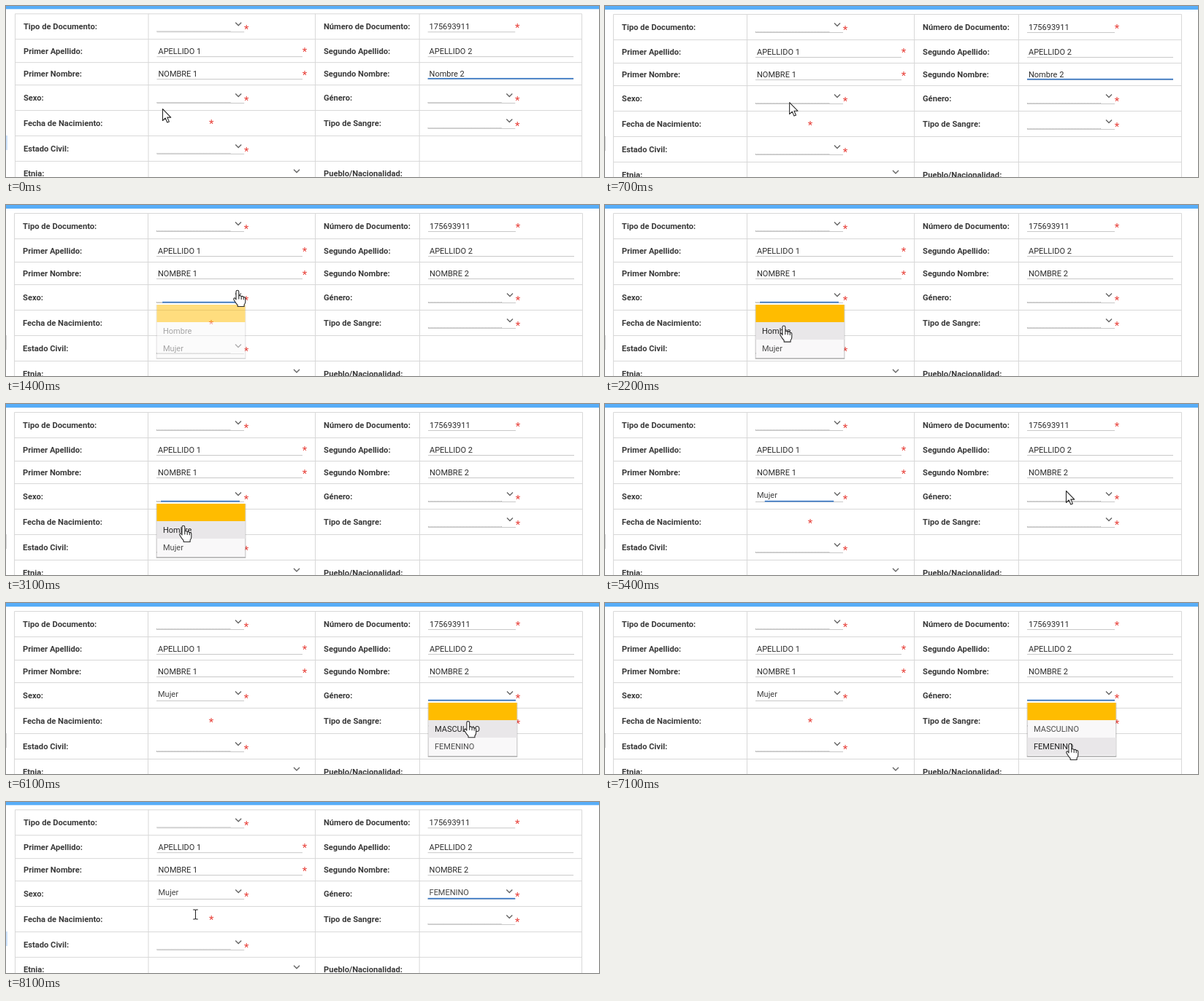
Recreate the animation shown at these times as an HTML page. Size 812x235 px, loop 8200 ms.

```html
<!DOCTYPE html>
<html lang="es">
<head>
<meta charset="utf-8">
<title>Formulario</title>
<style>
html, body { margin: 0; width: 100%; height: 100%; overflow: hidden; background: #fff; }
svg { display: block; width: 812px; height: 235px; }
text { font: 11px Roboto, Arial, sans-serif; fill: #2b2b2b; white-space: pre; }
.label { font-size: 11.2px; font-weight: 700; fill: #3a3a3a; }
.star { font-size: 15px; fill: #e8413a; text-anchor: middle; }
.value { fill: #444; }
.grid { stroke: #d8d8d8; fill: none; }
.line { stroke: #c8c8c8; }
.dots { stroke: #a8a8a8; stroke-dasharray: 1 1; }
.chevron { fill: none; stroke: #666; stroke-width: 1.4; }
</style>
</head>
<body>
<svg id="stage" viewBox="0 0 812 235"></svg>
<script>
const LOOP = 8200, STEP = 100;
const stage = document.getElementById('stage');

function set(el, attrs) {
  for (const k in attrs) el.setAttribute(k, attrs[k]);
}
function add(parent, tag, attrs, text) {
  const el = document.createElementNS('http://www.w3.org/2000/svg', tag);
  set(el, attrs);
  if (text) el.textContent = text;
  parent.appendChild(el);
  return el;
}

// Page and table grid
const page = add(stage, 'g', {});
const cols = [11.5, 194.5, 423.5, 566.5, 789.5];
const rows = [11.5, 46.5, 78.5, 109.5, 144.5, 179.5, 214.5, 248.5];
add(page, 'rect', { x: -5, y: -5, width: 822, height: 10, fill: '#57adf8' });
const edge = add(page, 'rect', { x: -1, y: 179, width: 2, height: 20 });
add(page, 'path', {
  class: 'grid',
  d: cols.map(x => `M${x} 11.5V245`).join('') + rows.map(y => `M11.5 ${y}H789.5`).join('')
});

// Form cells: every part is placed from the middle of its row
const rule = (x1, x2, y, cls) => add(page, 'line', { x1, x2, y1: y, y2: y, class: cls });
const star = (x, y) => add(page, 'text', { x, y: y + 7.5, class: 'star' }, '*');
const lineOf = mid => Math.floor(mid + 7.5) + .5;

const input = (text, width, required) => (x, mid) => {
  rule(x, x + width, lineOf(mid), 'line');
  if (required) star(x + width + 3, mid - 1);
  return { value: add(page, 'text', { x: x + 2, y: mid + 4 }, text) };
};
const select = (width, required) => (x, mid) => {
  const y = lineOf(mid), end = x + width;
  const dots = rule(x, end - 18, y - 1, 'dots');
  rule(x, end, y, 'line');
  add(page, 'path', { d: `M${end - 12} ${mid - 5.5}l4 4 4-4`, class: 'chevron' });
  if (required) star(end + 3, mid + 1.5);
  return { dots, value: add(page, 'text', { x: x + 2, y: mid + 2.2, class: 'value' }) };
};
const date = (x, mid) => star(x + 75, mid - 1);

const form = [
  ['Tipo de Documento:', select(120, true), 'Número de Documento:', input('175693911', 120, true)],
  ['Primer Apellido:', input('APELLIDO 1', 200, true), 'Segundo Apellido:', input('APELLIDO 2', 200)],
  ['Primer Nombre:', input('NOMBRE 1', 200, true), 'Segundo Nombre:', input('', 200)],
  ['Sexo:', select(120, true), 'Género:', select(120, true)],
  ['Fecha de Nacimiento:', date, 'Tipo de Sangre:', select(120, true)],
  ['Estado Civil:', select(120, true)],
  ['Etnia:', select(200), 'Pueblo/Nacionalidad:']
];
const mids = form.map((_, i) => (rows[i] + rows[i + 1]) / 2);
const cells = form.map((row, i) => row.map((part, j) => {
  const x = cols[j] + 11.5;
  return typeof part === 'string'
    ? add(page, 'text', { x, y: mids[i] + 4, class: 'label' }, part)
    : part(x, mids[i]);
}));
const secondName = cells[2][3], sex = cells[3][1], gender = cells[3][3];

// Focus underline that grows from its middle
function focusLine(col, row, w) {
  const x = cols[col] + 11.5;
  const el = add(page, 'rect', { y: lineOf(mids[row]) - 1.7, height: 1.7, fill: '#3878c6' });
  return k => set(el, { x: x + w * (1 - k) / 2, width: w * k });
}
const nameFocus = focusLine(3, 2, 200);
const sexFocus = focusLine(1, 3, 120);
const genderFocus = focusLine(3, 3, 120);

// Dropdown: blank selected row and two options
const TOP = 137, ITEM = 24, WIDE = 121;
function menu(col, options) {
  const x = cols[col] + 12;
  const g = add(page, 'g', {});
  const box = (i, n, fill) =>
    add(g, 'rect', { x, y: TOP + ITEM * i, width: WIDE, height: ITEM * n, fill });
  for (const d of [.4, 1]) {
    add(g, 'rect', {
      x: x - d, y: TOP + 1 - d, width: WIDE + 2 * d, height: ITEM * 3 + 1 + 2 * d, opacity: .18
    });
  }
  box(0, 3.05, '#f9f8f9');
  box(0, 1, '#ffbc00');
  const items = options.map((s, i) => ({
    bg: box(i + 1, 1, '#e9e7e9'),
    text: add(g, 'text', { x: x + 8.5, y: TOP + ITEM * (i + 1) + 16 }, s)
  }));
  return (opacity, y) => {
    set(g, { opacity });
    const hover = Math.floor((y - TOP) / ITEM) - 1;
    items.forEach(({ bg, text }, i) => {
      set(bg, { opacity: i === hover ? 1 : 0 });
      text.style.fill = i === hover ? '#222' : '#4c4c4c';
    });
  };
}
const sexMenu = menu(1, ['Hombre', 'Mujer']);
const genderMenu = menu(3, ['MASCULINO', 'FEMENINO']);

// Pointers, with the hot spot at 0,0
const pointer = (d, fill) => add(stage, 'path', {
  d, fill, stroke: '#2a2a2a', 'stroke-width': 1.1, 'stroke-linejoin': 'round', 'stroke-linecap': 'round'
});
const pointers = {
  arrow: pointer('M.5 .5V16.5L4.2 13 6.8 19 9.4 17.9 6.8 12.1H11.8Z', '#fff'),
  hand: pointer('M-2 13V2.2a1.9 1.9 0 0 1 3.8 0V8q1.8-1.2 3.4 .7 2-.9 3.1 .9 2.2-.4 2.5 1.7V16' +
    'q0 2.4-1.7 4.2V22.5H.2V20.6Q-2.6 17.6-5 13.2-5.7 11-3.8 10.8-2.8 11-2 13' +
    'M1.8 8V12M5.2 9V12.4M8.3 10V12.8', '#fff'),
  beam: pointer('M-3-6.5H-1L0-5.8 1-6.5H3M0-5.8V5.8M-3 6.5H-1L0 5.8 1 6.5H3', 'none')
};

// Pointer moves: start, end, x, y
const home = [214, 141];
const moves = [
  [600, 1300, 317, 117],
  [1500, 2500, 243, 167],
  [3100, 3500, 246, 186],
  [4100, 4700, 566, 133],
  [4900, 5400, 631, 119],
  [5700, 6400, 633, 166],
  [6700, 7100, 637, 193],
  [7700, 8100, 259.5, 154.5]
];

const ramp = (t, a, b) => Math.min(1, Math.max(0, (t - a) / (b - a)));
const easeOut = k => 1 - (1 - k) ** 3;
const between = (t, a, b) => t >= a && t < b;

function pointerAt(t) {
  return moves.reduce(([px, py], [a, b, x, y]) => {
    const k = easeOut(ramp(t, a, b));
    return [px + (x - px) * k, py + (y - py) * k];
  }, home);
}

function choose(cell, text, chosen) {
  cell.value.textContent = chosen ? text : '';
  set(cell.dots, { opacity: chosen ? 0 : 1 });
}

function render(t) {
  const [x, y] = pointerAt(t);

  // Slightly zoomed out around the loop point
  const zoomed = !between(t, 300, 8100);
  set(page, { transform: zoomed ? 'matrix(.9975 0 0 .998 1.03 -.7)' : 'translate(0 0)' });
  set(edge, { fill: zoomed ? '#c9e0fa' : '#d5d5d5' });

  secondName.value.textContent = t < 1200 ? 'Nombre 2' : 'NOMBRE 2';
  nameFocus(1 - ramp(t, 1100, 1400));
  sexFocus(.9 * (easeOut(ramp(t, 1200, 1500)) - ramp(t, 5350, 5750)));
  genderFocus(easeOut(ramp(t, 5400, 5700)));

  choose(sex, 'Mujer', t >= 3700);
  choose(gender, 'FEMENINO', t >= 7700);
  sexMenu(ramp(t, 1300, 1500) - ramp(t, 3700, 3900), y);
  genderMenu(ramp(t, 5400, 5600) - ramp(t, 7700, 7900), y);

  const kind = t >= 8000 ? 'beam'
    : between(t, 1200, 3800) || between(t, 5500, 7800) ? 'hand' : 'arrow';
  for (const k in pointers) {
    set(pointers[k], {
      transform: `translate(${x} ${y})`,
      visibility: k === kind ? 'visible' : 'hidden'
    });
  }
}

const origin = performance.now();
function tick() {
  const t = (performance.now() - origin) % LOOP;
  render(Math.floor(t / STEP) * STEP);
  requestAnimationFrame(tick);
}
tick();
</script>
</body>
</html>
```
